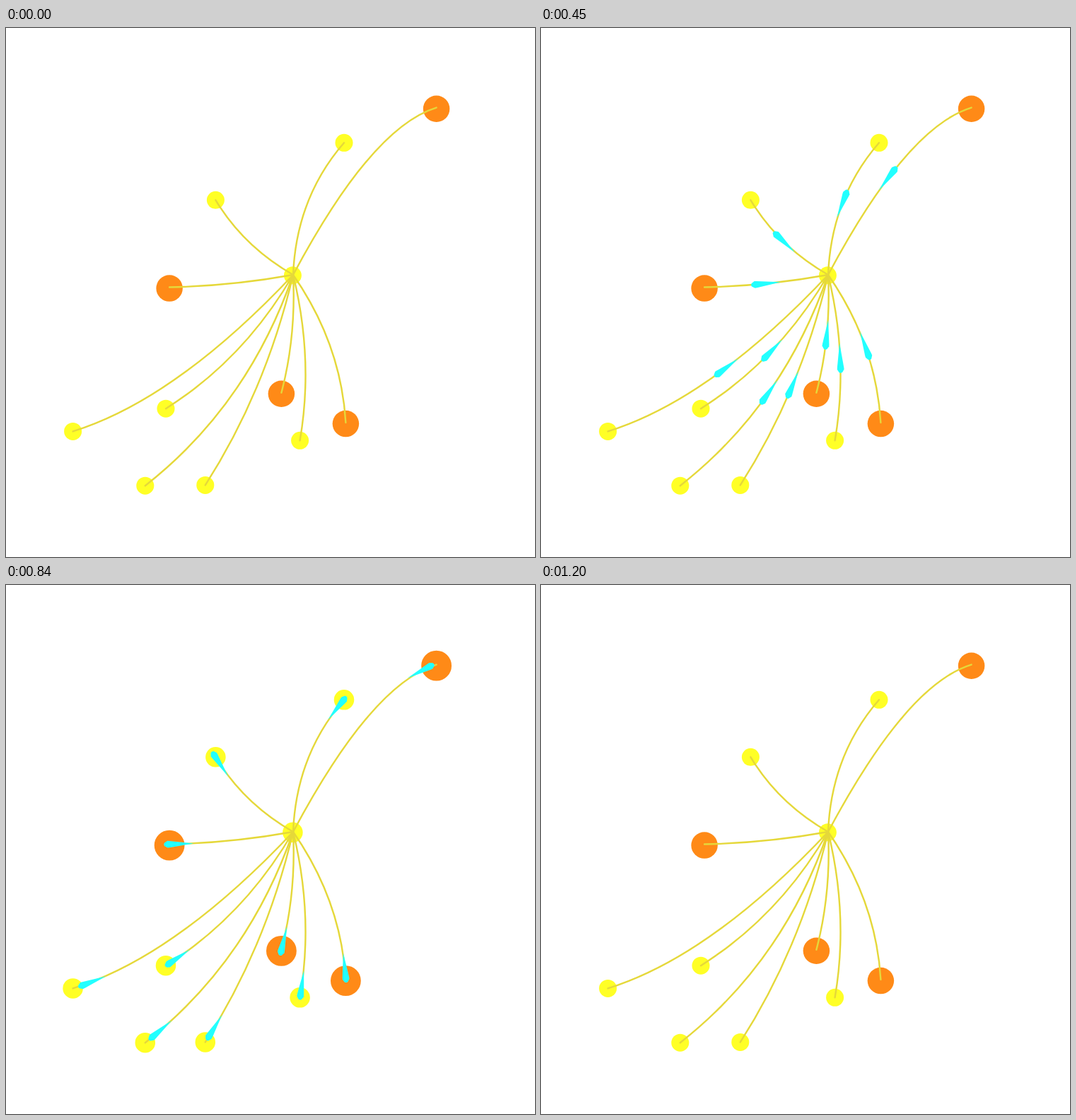
Animation of 748x748 px, one loop 1.53 s. Source, as an HTML page:

```html
<!DOCTYPE html>
<html>
<head>
<meta charset="utf-8">
<style>
html, body { margin: 0; width: 100%; height: 100%; overflow: hidden; background: #fff; }
svg { display: block; width: 100vw; height: 100vh; }
.link { fill: none; stroke: #e5d83a; stroke-width: 2.4; stroke-linecap: round; }
.comet { fill: #2ff; }
</style>
</head>
<body>
<svg viewBox="0 0 748 748"></svg>
<script>
const LOOP = 1530, STEP = 30;
const RIPPLE = 750, RIPPLE_END = 360;
const COMET_START = 64, COMET_END = 870;
const SMALL = { r: 12.5, color: '#ffff26' }, LARGE = { r: 18.75, color: '#ff8a17' };
const HUB = { x: 406, y: 349 };
const svg = document.querySelector('svg');

// type, x, y, sideways bend of the link, where along the link it bends
const nodes = [
  [LARGE, 608.6, 114.2, .165, .74], [LARGE, 231.1, 368.1, .04],
  [LARGE, 389.4, 517.3, .077], [LARGE, 480.4, 559.6, .14],
  [SMALL, 478, 162.3, .175], [SMALL, 296.4, 243.3, .13],
  [SMALL, 94.6, 570.4, .124, .62], [SMALL, 226, 538.2, .123],
  [SMALL, 196.8, 647.2, .147], [SMALL, 281.8, 646.4, .085],
  [SMALL, 415.6, 583.3, .104]
];

function add(tag, attrs) {
  const el = document.createElementNS('http://www.w3.org/2000/svg', tag);
  for (const name in attrs) el.setAttribute(name, attrs[name]);
  return svg.appendChild(el);
}

function addNode([{ r, color }, cx, cy]) {
  add('circle', { cx, cy, r, fill: color });
  return { r, el: add('circle', { cx, cy, fill: 'none', stroke: color }) };
}

function addLink([type, x, y, bend, lean = .515]) {
  const endY = type === LARGE ? y - 1.6 : y;
  const dx = x - HUB.x, dy = endY - HUB.y;
  const cx = HUB.x + lean * dx + bend * dy, cy = HUB.y + lean * dy - bend * dx;
  return add('path', { class: 'link', d: `M${HUB.x} ${HUB.y}Q${cx} ${cy} ${x} ${endY}` });
}

function addComet(path) {
  const el = add('path', { class: 'comet', d: 'M20-2.4Q22 0 20 2.4L16 4.9 13 4.7-21 0 13-4.7 16-4.9Z' });
  return { path, el, length: path.getTotalLength() };
}

const rings = [...nodes, [SMALL, 405.4, 349.8]].map(addNode);
const comets = nodes.map(addLink).map(addComet);

function show(el, visible) {
  el.style.display = visible ? '' : 'none';
}

function drawRings(t) {
  const age = t % RIPPLE, scale = .935 + .0023 * age;
  for (const { el, r } of rings) {
    const width = r * .267 * (2 - scale);
    show(el, scale > 1 && age <= RIPPLE_END);
    el.setAttribute('r', r * scale - width / 2);
    el.setAttribute('stroke-width', width);
  }
}

function drawComets(t) {
  const visible = t > COMET_START && t < COMET_END;
  const age = Math.max(t - COMET_START, 0);
  const share = 1 - Math.exp(-((age / 466) ** 1.87));
  for (const { el, path, length } of comets) {
    show(el, visible);
    const at = Math.min(Math.max(share * length, 1), length - 1);
    const a = path.getPointAtLength(at - 1), b = path.getPointAtLength(at + 1);
    const angle = Math.atan2(b.y - a.y, b.x - a.x) * 180 / Math.PI;
    el.setAttribute('transform', `translate(${(a.x + b.x) / 2} ${(a.y + b.y) / 2}) rotate(${angle})`);
  }
}

const start = performance.now();
function tick() {
  const elapsed = (performance.now() - start) % LOOP;
  const t = Math.floor(elapsed / STEP) * STEP;
  drawRings(t);
  drawComets(t);
  requestAnimationFrame(tick);
}
tick();
</script>
</body>
</html>
```
